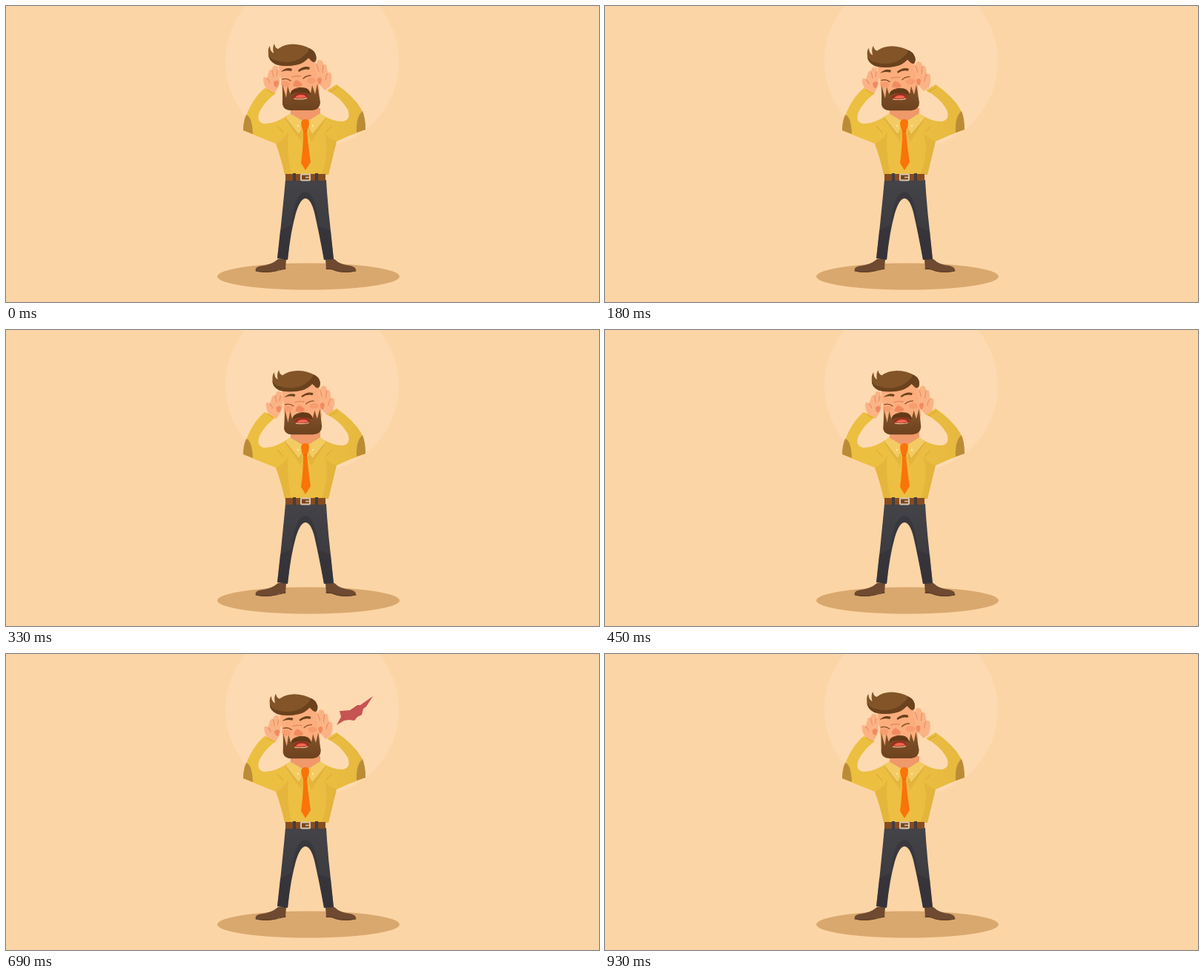
An HTML page that plays this animation: 800x400 px, repeating every 960 ms.

```html
<!DOCTYPE html>
<html lang="en">
<head>
<meta charset="utf-8">
<title>Headache</title>
<style>
  html, body { margin: 0; width: 100%; height: 100%; overflow: hidden; background: #fcd5a6; }
  svg { display: block; width: 100%; height: 100%; }
  .line { fill: none; stroke-linecap: round; stroke-linejoin: round; }
</style>
</head>
<body>
<svg viewBox="0 0 800 400">
  <defs>
    <linearGradient id="denim" x2="0" y2="1">
      <stop offset="0" stop-color="#434348"/>
      <stop offset="1" stop-color="#39373c"/>
    </linearGradient>
    <linearGradient id="cloth">
      <stop offset="0" stop-color="#ebbf40"/>
      <stop offset=".5" stop-color="#edbf42"/>
      <stop offset="1" stop-color="#e6b83e"/>
    </linearGradient>
    <linearGradient id="beard" x2="0" y2="1">
      <stop offset="0" stop-color="#85552c"/>
      <stop offset="1" stop-color="#6d421e"/>
    </linearGradient>
  </defs>

  <circle cx="413" cy="75" r="117" fill="#fddab1"/>
  <ellipse cx="408" cy="365.500" rx="123" ry="18" fill="#d9a86e"/>

  <!-- shoes and trousers -->
  <g fill="#6f4a30">
    <path d="M367 342H378L377 356Q369 355 364 358Q349 362 337 358Q335 353 343 351.500Q358 350 367 342Z"/>
    <path d="M431 342H443Q451 350 465 351Q473 353 472 358Q457 362 445 358Q440 355 432 356Z"/>
  </g>
  <path class="line" d="M337 358Q350 361 364 358L377 355M432 355Q440 355 446 358Q458 361 472 358" stroke="#573a26"/>
  <path d="M377 235H432Q434 270 438 304L442 342L429 343Q422 305 416 279Q411 260 404 260Q397 260 391 280Q384 305 380 343L366 341Q372 290 377 235Z" fill="url(#denim)"/>
  <g fill="#323036" opacity=".5">
    <path d="M370 303L385 296L380 343L366 341Z"/>
    <path d="M421 297L438 304L442 342L429 343Z"/>
    <path d="M404 251Q419 252 423 308Q416 260 404 260Q394 260 385 302Q388 253 404 251Z"/>
  </g>
  <path d="M384 138H424V152L404 160L384 152Z" fill="#f0996a"/>

  <g id="head">
    <!-- face -->
    <path d="M367 77Q372 70 391 69L417 70Q420 88 423 114L421 130H374L371 100Z" fill="#fbad7d"/>
    <path d="M370 78Q386 84 399 77L409 69L416 76L417 71L369 70Z" fill="#e88f5c" opacity=".55"/>
    <g fill="#f28a60">
      <ellipse cx="377" cy="105" rx="6" ry="4" opacity=".45"/>
      <ellipse cx="412" cy="101" rx="6" ry="4" opacity=".45"/>
      <path d="M387 108Q388 101 392 100Q398 102 400 107Q394 111 387 108Z"/>
    </g>
    <path d="M371 89Q378 82 386 85L385 88Q378 86 371 89ZM394 87Q402 80 410 83L409 86Q402 84 395 89Z" fill="#6b401c"/>
    <path class="line" d="M373 99Q379 97 384 101M411 94Q405 94 401 98" stroke="#8c4d29" stroke-width="1.4"/>
    <path class="line" d="M386 96Q392 94 398 95" stroke="#de8456" stroke-width="1.1"/>
    <!-- beard and mouth -->
    <path d="M373 106L378 124L380 108L384 121Q384 112 394 110Q407 108 411 118L413 107L417 119L420 105L424 130Q424 140 413 141H384Q375 141 373 133Z" fill="url(#beard)"/>
    <path d="M383 121Q384 111 393 112Q396 109 399 111Q409 109 411 120Q403 116 397 117Q390 116 383 121Z" fill="#633917"/>
    <path d="M386 124Q387 118 397 117Q407 117 408 123Q399 127 386 124Z" fill="#98301f"/>
    <path d="M390 124Q392 120 398 120Q404 120 405 123Q398 126 390 124Z" fill="#f0654f"/>
    <path d="M388 124.500Q398 127 407 123.500L405 125.500Q397 127 389 126Z" fill="#f3cfa8"/>
    <!-- hands -->
    <g fill="#fbb385">
      <path d="M352 113Q347 106 347 98Q349 94 352 98L354 91Q355 85 359 86Q360 79 365 81Q368 82 367 86Q372 87 371 92L369 98Q370 105 366 112L362 119Z"/>
      <path d="M430 114L421 104Q418 96 419 90L416 84Q415 79 419 78Q420 72 424 73Q428 74 428 79Q433 78 433 84L434 90Q438 89 439 93Q440 100 437 109Z"/>
    </g>
    <g fill="#f28a60">
      <path d="M361 103Q367 98 368 104L366 110Q361 110 361 103Z"/>
      <path d="M420 98Q426 94 426 101L424 106Q420 105 420 98Z"/>
    </g>
    <path class="line" d="M352 98Q355 100 356 104M359 87L361 96M366 87L365 94M434 91Q431 95 431 100M428 80L427 90M419 79L422 88" stroke="#ea8d60" stroke-width="1.1"/>
    <!-- hair -->
    <path d="M364 79Q354 74 354 65Q353 57 356 54Q356 61 361 64Q359 55 362 51Q363 57 367 58Q378 50 393 52Q407 54 415 61Q420 67 418 74Q415 78 411 73L408 70Q402 77 394 79Q378 83 364 79Z" fill="#825428"/>
    <path d="M364 79Q354 74 354 65Q357 73 366 74Q382 79 397 71Q404 66 408 61Q407 54 415 61Q420 67 418 74Q415 78 411 73L408 70Q402 77 394 79Q378 83 364 79Z" fill="#6b421d"/>
  </g>

  <!-- shirt -->
  <path d="M349 111L364 118Q349 129 342 143Q337 157 348 159Q362 160 381 147L404 170L426 147Q443 157 455 156Q466 153 461 140Q452 124 433 114L446 106Q469 122 479 139Q485 149 485 167Q465 174 446 183L443 195L435 228H376Q371 205 364 186Q341 177 320 168Q322 149 330 135Q338 120 349 111Z" fill="url(#cloth)"/>
  <g fill="#bb8c35">
    <path d="M324 147Q332 149 333 173L320 168Q320 156 324 147Z"/>
    <path d="M481 142Q472 149 473 171L485 167Q485 152 481 142Z"/>
  </g>
  <g fill="#d9a632" opacity=".35">
    <path d="M364 186Q376 181 381 169Q378 192 385 228H376Q371 205 364 186Z"/>
    <path d="M446 183Q434 180 429 170Q438 193 426 228H435L443 195Z"/>
    <path d="M376 152L398 184L401 172ZM432 152L412 184L407 172Z"/>
  </g>
  <path class="line" d="M352 113L360 118M436 116L447 110M366 162L374 171M439 163L432 170" stroke="#d6a431"/>
  <path d="M383 145L377 151L395 174L403 157ZM424 145L432 151L413 174L405 157Z" fill="#f3cb62"/>
  <path class="line" d="M377 151L395 174L401 163M432 151L413 174L407 163" stroke="#d6a63a" stroke-width=".8"/>
  <path d="M383 145Q404 151 424 145L404 156Z" fill="#f0996a"/>
  <g fill="#ffeaa8">
    <circle cx="394" cy="162" r="1.2"/>
    <circle cx="414" cy="162" r="1.2"/>
  </g>
  <path d="M398 158Q399 153 404 153Q409 153 409 158Q409 164 406 169Q408 192 411 211L404 222L398 212Q401 192 401 169Q398 164 398 158Z" fill="#f97409"/>
  <path class="line" d="M401 169H406" stroke="#e06206"/>

  <!-- belt -->
  <path d="M377 227H431V236H377Z" fill="#864b1f"/>
  <path d="M387 226H391V237H387ZM417 226H421V237H417Z" fill="#403e43"/>
  <rect x="398" y="227.500" width="12" height="8" rx="1" fill="#7a451d" stroke="#d5c8b8" stroke-width="2"/>
  <path d="M404 231.500H410" stroke="#d5c8b8" stroke-width="1.500"/>

  <path id="bolt" d="M446 96L452 85L450 77L464 76L474 69L478 69L495 57L486 71L482 74L480 82L474 85L470 90L463 89L456 90Z" fill="#c75352"/>
</svg>
<script>
  const LOOP = 960, STEP = 30;
  const head = document.getElementById("head");
  const bolt = document.getElementById("bolt");

  // time, shift in x, height, lean in degrees; all about the neck
  const sway = [
    [0, 0, 1, 0], [180, 0, .972, 0], [330, 1.2, .966, 3], [570, 1.4, .966, 3.3],
    [690, .4, .972, 1], [840, -.8, .99, -.6], [930, -.3, 1, -.2], [LOOP, 0, 1, 0]
  ];

  function poseAt(t) {
    const i = sway.findIndex(key => key[0] > t);
    const a = sway[i - 1], b = sway[i];
    const p = (t - a[0]) / (b[0] - a[0]);
    return a.map((v, k) => v + (b[k] - v) * p);
  }

  const about = (x, y, change) => `translate(${x} ${y}) ${change} translate(${-x} ${-y})`;

  function draw(now) {
    const t = Math.floor(now % LOOP / STEP) * STEP;
    const [, shift, height, lean] = poseAt(t);
    head.setAttribute("transform", about(402, 150, `translate(${shift} 0) skewX(${-lean}) scale(1 ${height})`));

    // the bolt shoots out of the head, then shrinks into its far tip
    const growing = t <= 690;
    const size = growing ? (t - 600) / 90 : (780 - t) / 90;
    bolt.style.display = size > 0 ? "" : "none";
    if (size > 0) {
      const [x, y] = growing ? [446, 96] : [495, 57];
      bolt.setAttribute("transform", about(x, y, `scale(${size})`));
    }
    requestAnimationFrame(draw);
  }
  draw(performance.now());
</script>
</body>
</html>
```
